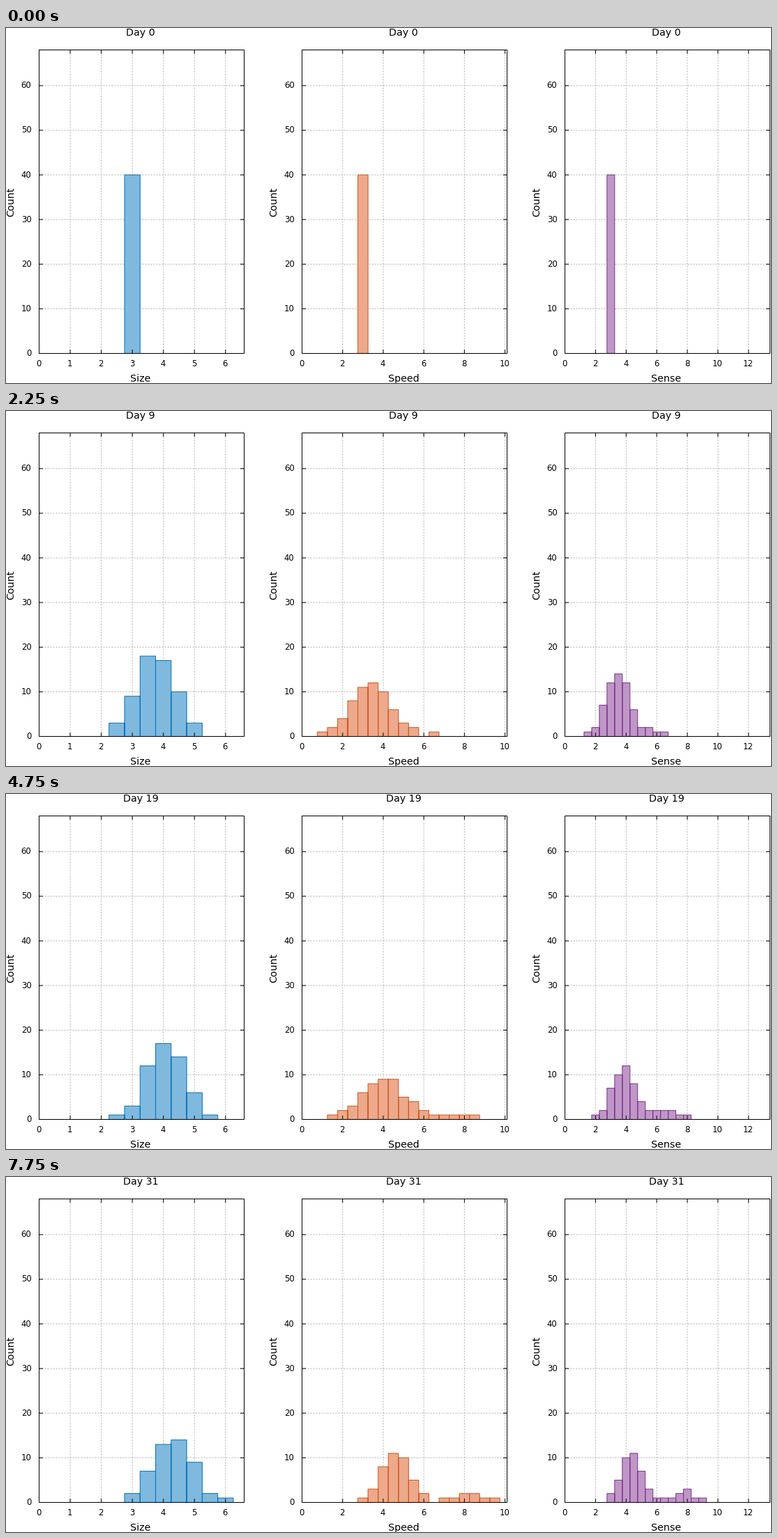
A matplotlib script that plays this animation: 1097x510 px, repeating every 8000 ms.

```python
import math

import numpy as np
import matplotlib.pyplot as plt
from matplotlib.animation import FuncAnimation
from matplotlib.collections import LineCollection
from matplotlib.patches import PathPatch, Rectangle
from matplotlib.path import Path

W, H, DPI = 1097, 510, 64
PX = 72 / DPI                      # one pixel in points
DAYS = 32
BIN = 0.5
LEFT, GAP, WIDTH = 47.5, 377, 294  # first panel, panel spacing, panel width
TOP, BASE = 31.5, 467.5
COUNT_PX = (BASE - TOP) / 68

# Turning points of the evolution; traits drift between them
KEY_DAYS = (0, 5, 16, 31)
TRAITS = {
    "Size": dict(
        color="#0072bd", limit=6.6, step=1,
        mean=(3, 3.57, 4, 4.32), sd=(0, 0.65, 0.58, 0.62),
        share=(0, 0, 0, 0), far=(3, 3, 3, 3)),
    "Speed": dict(
        color="#d95319", limit=10.1, step=2,
        mean=(3, 3.05, 3.8, 4.6), sd=(0, 0.8, 1.2, 0.7),
        share=(0, 0, 0.06, 0.17), far=(3, 4.5, 7.5, 8.2)),
    "Sense": dict(
        color="#7e2f8e", limit=13.4, step=2,
        mean=(3, 3.25, 3.7, 4.35), sd=(0, 0.7, 0.8, 0.65),
        share=(0, 0.03, 0.15, 0.2), far=(3, 5, 6.4, 7.7)),
}
FAR_SD = 0.8


def drift(day, values):
    """Random-walk pace: values change with the square root of time."""
    return np.interp(math.sqrt(day), np.sqrt(KEY_DAYS), values)


def population(day):
    """Fast growth to a peak, then a slow decline."""
    return drift(day, (40, 63, 56, 48))


def below(x, mean, sd):
    """Normal share of creatures with a trait below x."""
    return 0.5 + 0.5 * math.erf((x - mean) / (max(sd, 0.01) * math.sqrt(2)))


def histogram(trait, day):
    """Whole counts per bin for a main group and a far-off minority."""
    mean, sd, share, far = (drift(day, trait[k])
                            for k in ("mean", "sd", "share", "far"))
    edges = np.arange(-BIN / 2, trait["limit"], BIN)
    cdf = np.array([(1 - share) * below(x, mean, sd)
                    + share * below(x, far, FAR_SD) for x in edges])
    return edges, np.diff(np.rint(round(population(day)) * cdf))


def tint(color):
    """Half-way to white."""
    return tuple((1 + int(color[i:i + 2], 16) / 255) / 2 for i in (1, 3, 5))


plt.rcParams["font.family"] = "DejaVu Sans"
fig = plt.figure(figsize=(W / DPI, H / DPI), dpi=DPI, facecolor="white")
ax = fig.add_axes([0, 0, 1, 1])
ax.set(xlim=(0, W), ylim=(H, 0))
ax.axis("off")


def write(x, y, s, size=14.3, ha="center", **kw):
    return ax.text(x, y, s, fontsize=size * PX, ha=ha, va="baseline",
                   color="black", **kw)


def strokes(segments, **kw):
    ax.add_collection(LineCollection(segments, linewidths=PX, snap=False, **kw))


class Panel:
    def __init__(self, name, left):
        self.trait = trait = TRAITS[name]
        self.left = left
        self.unit = WIDTH / trait["limit"]
        right = left + WIDTH
        xs = np.arange(0, trait["limit"], trait["step"])
        ys = np.arange(0, 61, 10)
        px, py = left + xs * self.unit, BASE - ys * COUNT_PX

        grid = [[(x, BASE), (x, TOP)] for x in px[1:]]
        grid += [[(left, y), (right, y)] for y in py[1:]]
        strokes(grid, colors="#b0b0b0", linestyles=[(0, (2, 2))], zorder=1)

        self.bars = PathPatch(Path([(left, BASE)]), fc=tint(trait["color"]),
                              ec=trait["color"], lw=PX, joinstyle="miter",
                              snap=False, zorder=2)
        ax.add_patch(self.bars)

        ticks = [[(x, y), (x, y + d)] for x in px
                 for y, d in ((BASE, -5.5), (TOP, 5.5))]
        ticks += [[(x, y), (x + d, y)] for y in py
                  for x, d in ((left, 5.5), (right, -5.5))]
        strokes(ticks, colors="black", zorder=3)
        ax.add_patch(Rectangle((left, TOP), WIDTH, BASE - TOP, fill=False,
                               ec="black", lw=PX, snap=False, zorder=3))

        for v, x in zip(xs, px):
            write(x - 0.5, 486, f"{v:g}", 11.6)
        for v, y in zip(ys, py):
            write(left - 11, y + 3.5, f"{v:g}", 11.6, "right")
        middle = left + WIDTH / 2 - 1.5
        write(middle, 508, name)
        write(left - 36.5, 249.5, "Count", rotation=90,
              rotation_mode="anchor")
        self.title = write(middle, 11, "")

    def show(self, day):
        edges, counts = histogram(self.trait, day)
        x = self.left + edges * self.unit
        tops = BASE - counts * COUNT_PX
        boxes = [Path([(l, BASE), (l, t), (r, t), (r, BASE), (l, BASE)],
                      closed=True)
                 for l, r, t in zip(x, x[1:], tops) if t < BASE]
        self.bars.set_path(Path.make_compound_path(*boxes))
        self.title.set_text(f"Day {day}")


panels = [Panel(name, LEFT + i * GAP) for i, name in enumerate(TRAITS)]


def draw(day):
    for panel in panels:
        panel.show(day)
    return []


anim = FuncAnimation(fig, draw, frames=DAYS, init_func=lambda: draw(0),
                     interval=250, repeat=True, repeat_delay=0, blit=False)
plt.show()
```
